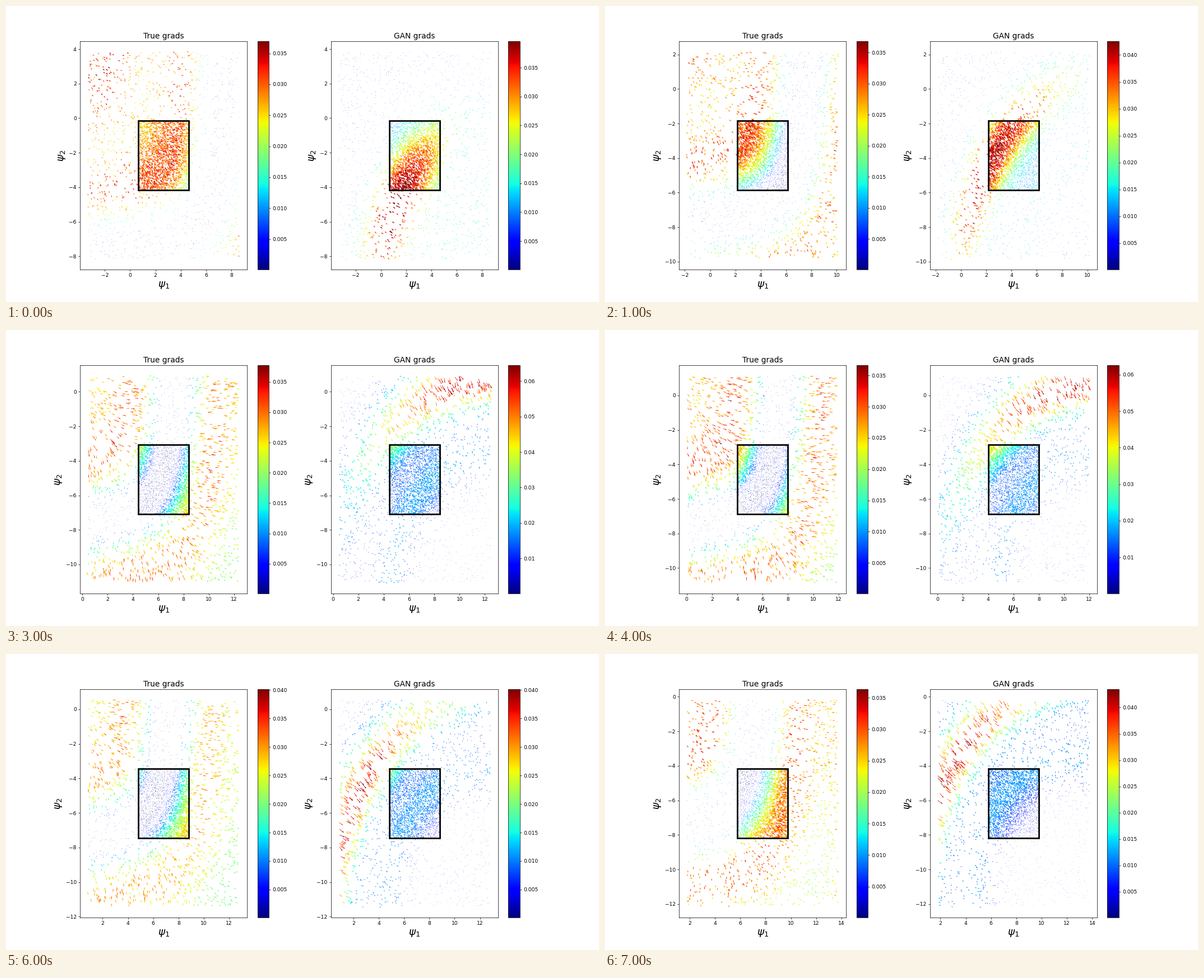
Recreate the animation shown at these times as a matplotlib script. Size 1058x529 px, loop 8 s.

```python
import numpy as np
import matplotlib.pyplot as plt
from matplotlib.animation import FuncAnimation
from matplotlib.colors import Normalize
from matplotlib.patches import Rectangle
from matplotlib.ticker import MultipleLocator

W, H, DPI = 1058, 529, 66.125
OUTER, INNER, LIMIT = 6.0, 2.0, 6.6      # half widths around the current point
N_OUTER, N_INNER = 1500, 2200
ARC_X, ARC_Y = 12.5, -11.5               # centre of the surrogate's ridge

plt.rcParams["font.family"] = "DejaVu Sans"
fig = plt.figure(figsize=(W / DPI, H / DPI), dpi=DPI, facecolor="white")

# path of the search: psi_1, psi_2, steepest true and surrogate gradient
STEPS = [
    (2.65, -2.16, 0.0369, 0.0395),
    (4.15, -3.85, 0.0368, 0.0425),
    (5.83, -5.14, 0.0370, 0.0518),
    (6.43, -5.08, 0.0377, 0.0644),
    (6.00, -4.87, 0.0366, 0.0625),
    (5.59, -4.70, 0.0356, 0.0602),
    (6.82, -5.45, 0.0401, 0.0401),
    (7.77, -6.18, 0.0363, 0.0434),
]


def bell(x, width):
    return np.exp(-(x / width) ** 2)


def true_field(x, y):
    """Magnitude and direction around a valley that follows a hyperbola."""
    p, q = 8 - x, y + 8.3
    half = (p - q) / 2
    root = np.sqrt(half ** 2 + 6)
    d = (p + q) / 2 - root
    plateau = 0.0275 + 0.0032 * np.cos((np.abs(d) - 2.8) * 2 * np.pi / 5.2)
    plateau -= 0.006 * bell(np.hypot(x - 13, y + 11), 5)
    mag = plateau * (1 - bell(d, 1.4 + 0.05 * np.abs(p - q))) + 0.0006
    side = -np.sign(d)
    return mag, np.arctan2(side * (1 + half / root), side * (half / root - 1))


def gan_field(x, y, peak, step):
    """Magnitude and direction of a ridge on an arc with a swell inside it."""
    start = np.exp(-step)
    dx, dy = ARC_X - x, ARC_Y - y
    r = np.hypot(dx, dy)
    turn = np.degrees(np.arctan2(-dy, -dx)) % 360
    radius = 12.3 + 0.9 * start
    crest = 150 - 2100 * (peak - 0.0395)
    ridge = bell(r - radius, 1.7 + 0.6 * start) * bell(turn - crest, 55 - 25 * start)
    swell = bell(r - 8, 1.8)
    inside = 1 / (1 + np.exp((r - radius) / 0.7))
    level = 0.1 + (0.15 * start - 0.03) * inside + 0.2 * swell + 0.84 * ridge
    return peak * level, np.arctan2(dy / r - 0.9, dx / r + 0.7)


def panel(left, title, cx, cy, x, y, mag, angle, peak):
    ax = fig.add_axes([left / W, 0.11, 298 / W, 0.77])
    cax = fig.add_axes([(left + 316.7) / W, 0.11, 20.35 / W, 0.77])
    arrows = ax.quiver(x, y, mag * np.cos(angle), mag * np.sin(angle), mag,
                       cmap="jet", norm=Normalize(0.0001, peak))
    ax.add_patch(Rectangle((cx - INNER, cy - INNER), 2 * INNER, 2 * INNER,
                           fill=False, ec="black", lw=3, zorder=5))
    ax.set(xlim=(cx - LIMIT, cx + LIMIT), ylim=(cy - LIMIT, cy + LIMIT))
    ax.xaxis.set_major_locator(MultipleLocator(2))
    ax.yaxis.set_major_locator(MultipleLocator(2))
    ax.set_title(title, fontsize=15)
    ax.set_xlabel(r"$\psi_1$", fontsize=20)
    ax.set_ylabel(r"$\psi_2$", fontsize=20)
    fig.colorbar(arrows, cax=cax, ticks=MultipleLocator(0.005 if peak < 0.045 else 0.01))


def draw(step):
    fig.clf()
    rng = np.random.default_rng(40 + step)
    cx, cy, true_peak, gan_peak = STEPS[step]
    u, v = np.hstack([rng.uniform(-OUTER, OUTER, (2, N_OUTER)),
                      rng.uniform(-INNER, INNER, (2, N_INNER))])
    x, y = cx + u, cy + v

    def jitter(mag, angle):
        noise = rng.standard_normal((2, mag.size))
        return mag * (1 + 0.07 * noise[0]), angle + 0.15 * noise[1]

    panel(132.25, "True grads", cx, cy, x, y, *jitter(*true_field(x, y)), true_peak)
    panel(579.7, "GAN grads", cx, cy, x, y,
          *jitter(*gan_field(x, y, gan_peak, step)), gan_peak)
    return []


anim = FuncAnimation(fig, draw, frames=len(STEPS), interval=1000,
                     repeat=True, repeat_delay=0, cache_frame_data=False)
plt.show()
```
